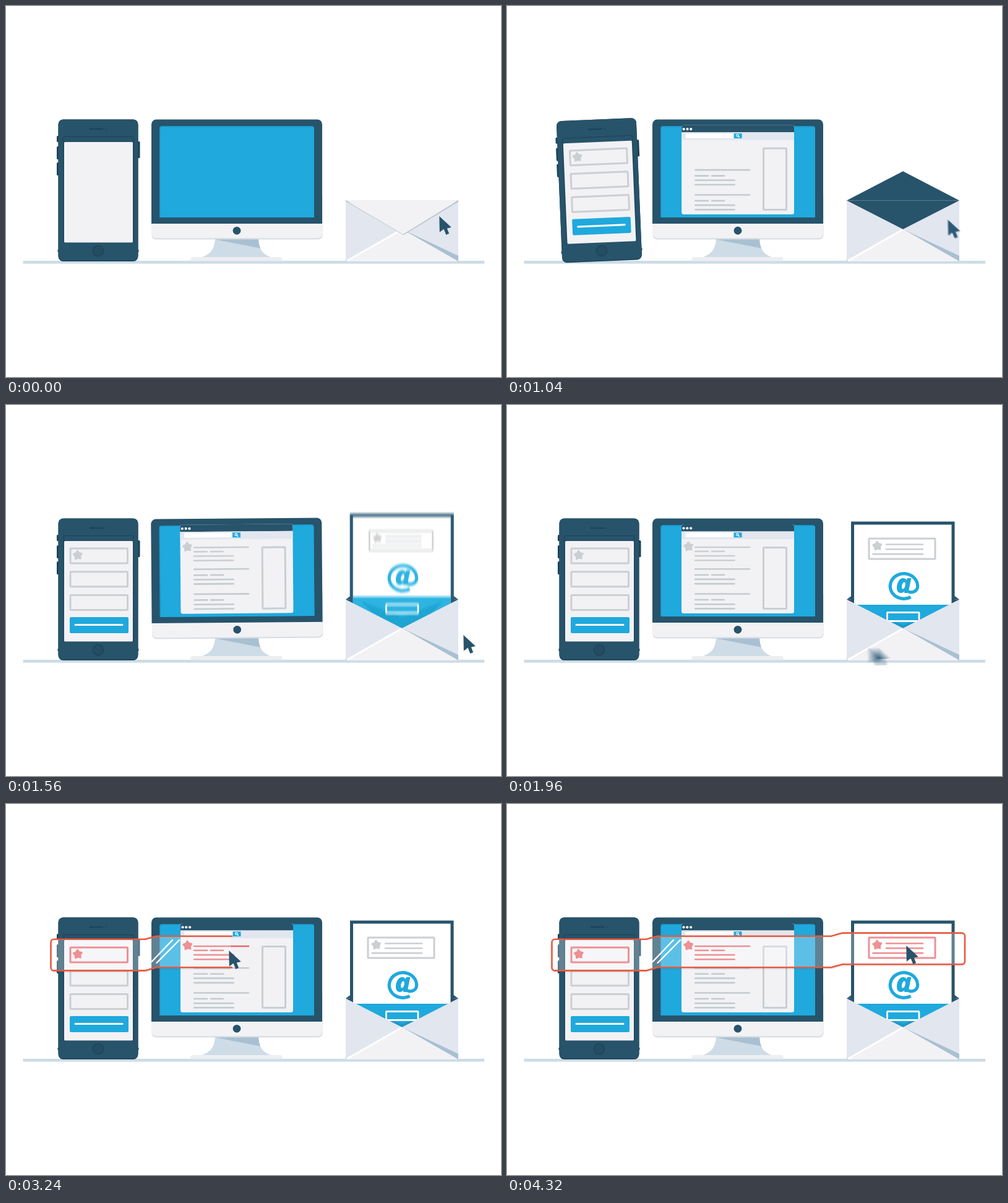
Recreate the animation shown at these times as an HTML page with a canvas. Size 800x600 px, loop 6720 ms.

```html
<!DOCTYPE html>
<html lang="en">
<head>
<meta charset="utf-8">
<title>Devices</title>
<style>
html, body { margin: 0; width: 100%; height: 100%; overflow: hidden; background: #fff; }
canvas { display: block; width: 100%; height: 100%; }
</style>
</head>
<body>
<canvas id="stage" width="800" height="600"></canvas>
<script>
const LOOP = 6720, STEP = 40;
const NAVY = '#27536b', DEEP = '#1c4359', BLUE = '#1fa9dc', PALE = '#f2f2f5';
const MIST = '#e2e6ef', FLOOR = '#cddce6', SHADE = '#a9c0d2', CORAL = '#e9593f';
const GRAY = [203, 207, 210], RED = [232, 102, 108];

const main = document.getElementById('stage').getContext('2d');
const newLayer = () => Object.assign(document.createElement('canvas'), { width: 800, height: 600 }).getContext('2d');
const sharp = newLayer(), smear = newLayer();
let c = main;

const lerp = (a, b, p) => a + (b - a) * p;
const span = (t, a, b) => Math.min(1, Math.max(0, (t - a) / (b - a)));
const inOut = p => p < .5 ? 4 * p ** 3 : 1 - 4 * (1 - p) ** 3;
const sine = p => (1 - Math.cos(Math.PI * p)) / 2;
const out = (p, power) => 1 - (1 - p) ** power;
const back = p => 1 + 2.7 * (p - 1) ** 3 + 1.7 * (p - 1) ** 2;
const ring = (d, amp, decay, period) => d < 0 || d > 600 ? 0 : amp * Math.exp(-d / decay) * Math.sin(d / period);
const tint = p => `rgb(${GRAY.map((v, i) => Math.round(lerp(v, RED[i], p)))})`;

function group(draw) {
  c.save();
  draw();
  c.restore();
}

function poly(fill, ...pts) {
  c.beginPath();
  pts.forEach(p => c.lineTo(...p));
  c.closePath();
  c.fillStyle = fill;
  c.fill();
}

// Rounded box given by its edges
function box(x0, y0, x1, y1, r, fill) {
  c.beginPath();
  c.roundRect(x0, y0, x1 - x0, y1 - y0, r);
  c.fillStyle = fill;
  c.fill();
}

function frame(x0, y0, x1, y1, color, w = 3) {
  c.beginPath();
  c.roundRect(x0, y0, x1 - x0, y1 - y0, 1);
  c.lineWidth = w;
  c.strokeStyle = color;
  c.stroke();
}

function line(x0, y0, x1, y1, color, w = 2.6, cap = 'round') {
  c.beginPath();
  c.moveTo(x0, y0);
  c.lineTo(x1, y1);
  c.lineCap = cap;
  c.lineWidth = w;
  c.strokeStyle = color;
  c.stroke();
}

function disc(x, y, r, fill) {
  c.beginPath();
  c.arc(x, y, r, 0, 7);
  c.fillStyle = fill;
  c.fill();
}

function clipBox(x, y, w, h) {
  c.beginPath();
  c.rect(x, y, w, h);
  c.clip();
}

function star(x, y, color) {
  c.beginPath();
  for (let i = 0; i < 10; i++) {
    const a = i * Math.PI / 5 - Math.PI / 2 - .08, r = i % 2 ? 4.6 : 7.4;
    c.lineTo(x + r * Math.cos(a), y + r * Math.sin(a));
  }
  c.closePath();
  c.fillStyle = c.strokeStyle = color;
  c.lineWidth = 2;
  c.lineJoin = 'round';
  c.fill();
  c.stroke();
}

function scaleAt(x, y, sx, sy) {
  c.translate(x, y);
  c.scale(sx, sy);
  c.translate(-x, -y);
}

function turnAt(x, y, deg) {
  c.translate(x, y);
  c.rotate(deg * Math.PI / 180);
  c.translate(-x, -y);
}

// Motion blur: average shifted copies along the path covered while the shutter is open
function blur(pos, t, shutter, draw) {
  const [ax, ay] = pos(t - shutter / 2), [bx, by] = pos(t + shutter / 2);
  if (Math.hypot(bx - ax, by - ay) < 2) return group(draw);
  const n = 15, home = c;
  sharp.clearRect(0, 0, 800, 600);
  smear.clearRect(0, 0, 800, 600);
  c = sharp;
  group(draw);
  c = home;
  smear.globalCompositeOperation = 'lighter';
  smear.globalAlpha = 1 / n;
  for (let i = 0; i < n; i++) {
    const k = i / (n - 1) - .5;
    smear.drawImage(sharp.canvas, (bx - ax) * k, (by - ay) * k);
  }
  c.drawImage(smear.canvas, 0, 0);
}

// ---- Phone ----
const formPos = t => [0, -160 * (1 - out(span(t, 551, 874), 2))];

function form(t) {
  const d = t - 780;
  const sx = d < 0 ? .8 : 1 - .2 * Math.exp(-d / 70) * Math.cos(d / 45);
  const color = tint(span(t, 2560, 2700));
  c.translate(...formPos(t));
  scaleAt(150.5, 300, sx, 1);
  for (let i = 0; i < 3; i++) {
    const y = 232 + 37.7 * i;
    frame(104, y, 196.5, y + 24, i ? tint(0) : color);
  }
  star(116, 243, color);
  box(103, 343, 198, 369, 2, BLUE);
  line(112, 355.5, 188, 355.5, '#fff', 3);
}

function phone(t) {
  turnAt(149, 298, -ring(t - 960, 5, 110, 55));
  box(82, 210, 88, 220, 1.5, DEEP);
  box(82, 227, 88, 248, 1.5, DEEP);
  box(82, 253, 88, 274, 1.5, DEEP);
  box(210, 219, 216.5, 246, 1.5, DEEP);
  box(83.5, 394, 214.5, 398, 1, DEEP);
  box(84.5, 183.5, 213.5, 413, 8, DEEP);
  box(84.5, 183.5, 213.5, 411.5, 8, NAVY);
  line(136, 199, 156, 199, DEEP, 2.4);
  disc(162, 199, 1, DEEP);
  frame(93, 211.5, 206, 382, DEEP, 1);
  box(94, 220, 205, 382.5, 1.5, PALE);
  disc(149, 396, 9.2, DEEP);
  disc(149, 396, 7.8, '#244d63');
  clipBox(93, 211, 112, 172);
  if (t > 551) blur(formPos, t, 28, () => form(t));
}

// ---- Monitor ----
function entry(y, color, gap) {
  const row = i => y + gap + 7.2 * i;
  line(304.2, y, 392, y, color);
  line(304.2, row(0), 325, row(0), color);
  line(331, row(0), 351, row(0), color);
  line(304.2, row(1), 367.5, row(1), color);
  line(304.2, row(2), 367.5, row(2), color);
}

function page(t) {
  const stretch = .1 * Math.exp(-Math.max(0, t - 680) / 140) * (1 - span(t, 680, 1100));
  c.translate(0, 160 * (1 - sine(span(t, 280, 660))));
  scaleAt(464, 337, 1 - stretch, 1 + stretch);
  box(282, 193, 464, 337, 3.5, PALE);
  box(282, 193, 464, 204.5, [4, 4, 0, 0], NAVY);
  box(282, 204.5, 464, 217, 0, MIST);
  for (let i = 0; i < 3; i++) disc(285.5 + 5.8 * i, 199.3, 2.1, '#fff');
  box(288.5, 206.5, 367, 214, 0, '#fff');
  box(366.5, 206.3, 379.5, 214.2, 0, BLUE);
  disc(372.4, 209.6, 2.4, '#fff');
  disc(372.4, 209.6, 1.2, BLUE);
  line(373.8, 211, 375.3, 212.5, '#fff', 1.4);
  entry(265.2, '#c4cbcf', 9.5);
  entry(305.5, '#c4cbcf', 9.5);
  if (t > 1220) group(() => {
    const off = 280 * (1 - out(span(t, 1220, 1440), 3));
    const color = tint(span(t, 2880, 3020));
    clipBox(282, 217, 182, 120);
    c.translate(off, 0);
    scaleAt(303, 240, 1 - Math.min(.2, off * .002), 1);
    star(293.5, 229, color);
    entry(230, color, 6.8);
  });
  frame(414.5, 230.5, 451.5, 329.5, '#c9ced2');
}

function stand() {
  c.beginPath();
  c.moveTo(338, 376);
  c.lineTo(408, 376);
  c.bezierCurveTo(409, 396, 416, 402, 430, 407);
  c.lineTo(314, 407);
  c.bezierCurveTo(330, 402, 337, 394, 338, 376);
  c.fillStyle = FLOOR;
  c.fill();
  c.clip();
  poly(SHADE, [338, 374], [412, 374], [412, 392], [338, 377.5]);
}

function monitor(t) {
  group(stand);
  box(298.5, 406, 446.5, 412.5, [3, 3, 0, 0], '#eceef2');
  group(() => {
    c.translate(0, ring(t - 680, 2, 120, 60));
    turnAt(373, 280, ring(t - 1240, 4.25, 160, 60));
    box(235.5, 300, 511.5, 377.5, 7, '#d5dce4');
    box(235.5, 300, 511, 375.5, 7, PALE);
    box(235, 183.5, 511, 352, [8, 8, 0, 0], NAVY);
    box(248, 194, 498, 342, [4, 4, 0, 0], '#1c93c2');
    box(249.5, 195.5, 498, 342, [3, 3, 0, 0], BLUE);
    disc(373, 363.3, 6.4, NAVY);
    clipBox(248, 185, 250, 157);
    if (t > 280) page(t);
  });
}

// ---- Letter and envelope ----
const sheetPos = t => [0, t < 1412
  ? lerp(365, 152, sine(span(t, 1172, 1412)))
  : lerp(152, 188.5, sine(span(t, 1412, 1660)))];

function atSign() {
  c.strokeStyle = c.fillStyle = BLUE;
  c.lineCap = 'butt';
  c.lineWidth = 5.2;
  c.beginPath();
  c.ellipse(641.5, 293, 22.2, 20.3, 0, 1.05, Math.PI * 2 - .05);
  c.bezierCurveTo(664, 301, 655, 305, 648, 301.5);
  c.stroke();
  c.font = 'italic 800 42px "Open Sans", sans-serif';
  c.textAlign = 'center';
  c.fillText('a', 641, 304);
}

function sheet(t) {
  const k = back(span(t, 1340, 1580));
  c.translate(0, sheetPos(t)[1] - 188.5);
  scaleAt(639.5, 188.5, lerp(.707, 1, k), lerp(1.12, 1, k));
  box(556, 188.5, 723.5, 440, 0, NAVY);
  box(561, 193.5, 718.5, 440, 0, '#fff');
  box(561, 323, 718.5, 440, 0, BLUE);
  poly('#1b98c8', [575, 331], [640, 356], [705, 331], [640, 400]);
  frame(614.5, 335.5, 666, 349.5, '#fff', 2.8);
  atSign();
  const pop = back(span(t, 1480, 1720));
  if (pop <= 0) return;
  const color = tint(span(t, 3880, 4040));
  scaleAt(638.5, 232.5, pop, pop);
  frame(585, 216, 692, 249, color);
  star(598.5, 228, color);
  for (let i = 0; i < 3; i++) {
    const y = 225.5 + 7.8 * i;
    line(i < 2 ? 613 : 591.5, y, 672, y, color);
  }
}

function envelope(t) {
  const L = 549, R = 731, MID = 640, TOP = 314.5, FOLD = 361, BASE = 413;
  const turn = lerp(1, -1, inOut(span(t, 880, 1120)));
  box(L, TOP, R, BASE, [0, 0, 4, 4], NAVY);
  if (turn < 0) poly(NAVY, [L, TOP], [MID, TOP + 67 * turn], [R, TOP]);
  if (t > 1160) group(() => {
    clipBox(540, 100, 200, 312);
    blur(sheetPos, t, 28, () => sheet(t));
  });
  group(() => {
    c.beginPath();
    c.roundRect(L, TOP, R - L, BASE - TOP, [0, 0, 4, 4]);
    c.clip();
    poly(MIST, [L, TOP], [MID, FOLD], [R, TOP], [R, BASE], [L, BASE]);
    poly(SHADE, [MID, FOLD], [R, BASE - 9], [R, BASE]);
    poly(PALE, [L - 2, BASE + 1], [MID, FOLD], [R, BASE]);
    line(L + 3, BASE - 1.5, MID - 2, FOLD + 1.5, '#fff', 3);
  });
  if (turn < 0) return;
  const tip = TOP + 54.5 * turn;
  line(642, tip + .6, R, TOP + 1, '#bcc5ce', 2, 'butt');
  line(L, TOP + 1, 642, tip + .6, '#cfd6de', 1.6, 'butt');
  poly(PALE, [L, TOP - .5], [R, TOP - .5], [642, tip]);
}

// ---- Glass band: three levels joined by slopes ----
const CUTS = [72.5, 234, 533, 740];

function rim(y) {
  const pts = [];
  for (let i = 0; i < 3; i++) {
    const level = y - 5.1 * i;
    pts.push([CUTS[i] + (i > 0) * 9, level], [CUTS[i + 1] - (i < 2) * 9, level]);
  }
  return pts;
}

const UPPER = rim(218.8), LOWER = rim(269.4);

function edge(pts) {
  c.beginPath();
  c.moveTo(CUTS[0], 230);
  pts.forEach((p, i) => c.arcTo(...p, ...(pts[i + 1] || [CUTS[3], 234]), 5));
  c.lineTo(CUTS[3], 234);
}

function band(t) {
  const len = 345 * out(span(t, 2632, 3400), 2) + 425 * sine(span(t, 3640, 4240));
  if (len <= 0) return;
  group(() => {
    clipBox(0, 190, len + 33, 100);
    poly('rgba(255,255,255,.27)', ...UPPER, ...[...LOWER].reverse());
    line(235.5, 255, 269, 220, '#fff', 2.4);
    line(243.5, 257, 280, 220, '#fff', 2.4);
    c.translate(0, 2.2);
    edge(LOWER);
    c.lineWidth = 2;
    c.strokeStyle = 'rgba(39,83,107,.13)';
    c.stroke();
  });
  const trace = (pts, l) => {
    if (l <= 0) return;
    c.setLineDash([l, 2000]);
    edge(pts);
    c.stroke();
  };
  group(() => {
    c.lineWidth = 2.6;
    c.lineCap = 'round';
    c.strokeStyle = CORAL;
    trace(LOWER, len);
    trace(UPPER, (len - 45) * 1.06);
  });
}

// ---- Pointer: stops joined by eased paths that sag by bow ----
const STOPS = [
  { x: 700, y: 340 },
  { x: 739, y: 372, from: 920, to: 1200, bow: -10 },
  { x: 150, y: 256, from: 1749, to: 2280, bow: 130 },
  { x: 360, y: 237, from: 2700, to: 3000, bow: 46 },
  { x: 655, y: 325, from: 3300, to: 3680, bow: 148 },
  { x: 645, y: 229, from: 3680, to: 3960, bow: 0 }
];

function pointerPos(t) {
  let { x, y } = STOPS[0];
  for (const s of STOPS.slice(1)) {
    const u = inOut(span(t, s.from, s.to));
    x = lerp(x, s.x, u);
    y = lerp(y, s.y, u) + 2 * u * (1 - u) * s.bow;
  }
  return [x, y];
}

function pointer(t) {
  blur(pointerPos, t, 9, () => {
    c.translate(...pointerPos(t));
    poly(NAVY, [.3, 0], [.8, 25.8], [7, 20.9], [19.8, 17.9]);
    line(8.5, 16, 13.7, 29, NAVY, 5.2, 'butt');
  });
}

function render(t) {
  c = main;
  c.fillStyle = '#fff';
  c.fillRect(0, 0, 800, 600);
  box(27.5, 412, 773, 416.7, 0, FLOOR);
  group(() => phone(t));
  group(() => monitor(t));
  group(() => envelope(t));
  band(t);
  pointer(t);
}

const start = performance.now();
function tick() {
  const t = (performance.now() - start) % LOOP;
  render(Math.floor(t / STEP) * STEP);
  requestAnimationFrame(tick);
}
tick();
</script>
</body>
</html>
```
